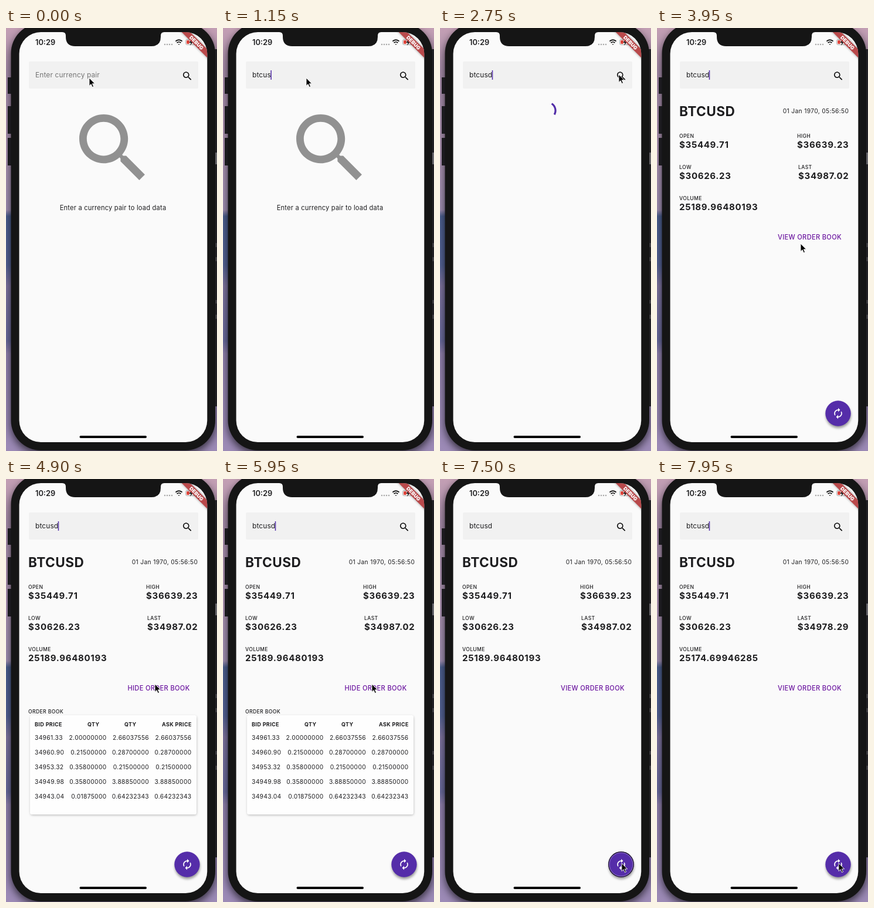
An HTML page for the animation above (8 s loop, 360 by 720 pixels).

```html
<!DOCTYPE html>
<html lang="en">
<head>
<meta charset="utf-8">
<title>Currency pair lookup</title>
<style>
  html, body { margin: 0; width: 100%; height: 100%; overflow: hidden; background: #151515; }
  svg { display: block; width: 100vw; height: 100vh; }
  text { font-family: Inter, sans-serif; fill: #1d1d1f; white-space: pre; }
  .input { font-size: 11.9px; letter-spacing: .13px; }
  .hint { fill: #757575; }
  .body { font-size: 11.1px; letter-spacing: .21px; }
  .title { font-size: 22.6px; font-weight: 700; letter-spacing: .5px; }
  .small { font-size: 10.24px; letter-spacing: .34px; }
  .label { font-size: 8.6px; font-weight: 500; letter-spacing: .38px; }
  .value { font-size: 15px; font-weight: 700; letter-spacing: .7px; }
  .button { font-size: 11.1px; font-weight: 500; letter-spacing: .32px; fill: #6a149f; text-anchor: middle; }
  .head { font-size: 9px; font-weight: 700; letter-spacing: .38px; }
  .end { text-anchor: end; }
</style>
</head>
<body>
<svg viewBox="0 0 360 720">
  <defs>
    <linearGradient id="sky" x2="0" y2="1">
      <stop offset="0" stop-color="#c39fb4"/>
      <stop offset=".1" stop-color="#a58ba8"/>
      <stop offset=".3" stop-color="#aa92b0"/>
      <stop offset=".43" stop-color="#a08fb2"/>
      <stop offset=".445" stop-color="#4c5f8f"/>
      <stop offset=".56" stop-color="#546294"/>
      <stop offset=".61" stop-color="#7f749f"/>
      <stop offset=".74" stop-color="#696a9c"/>
      <stop offset=".77" stop-color="#9080ac"/>
      <stop offset="1" stop-color="#9c8ab6"/>
    </linearGradient>
    <clipPath id="screen"><rect x="22.500" y="7" width="320.800" height="698" rx="37"/></clipPath>
    <filter id="soft" x="-30%" y="-30%" width="160%" height="160%"><feGaussianBlur stdDeviation="2"/></filter>
    <filter id="wide" x="-30%" y="-30%" width="160%" height="160%"><feGaussianBlur stdDeviation="7"/></filter>
    <path id="lens" d="M15.5 14h-.79l-.28-.27C15.41 12.59 16 11.11 16 9.5 16 5.91 13.09 3 9.5 3S3 5.91 3 9.5 5.91 16 9.5 16c1.61 0 3.09-.59 4.23-1.57l.27.28v.79l5 4.99L20.49 19zM9.5 14C7.01 14 5 11.99 5 9.5S7.01 5 9.5 5 14 7.01 14 9.5 11.99 14 9.5 14z"/>
  </defs>

  <rect width="360" height="720" fill="url(#sky)"/>
  <rect x="352" y="36" width="8" height="608" fill="#2d2c31"/>
  <rect x="357" y="212" width="3" height="20" fill="#8c8a90"/>
  <path d="M358.500 366v7M358.500 390v7M358.500 463v6M358.500 488v7" stroke="#8c8a90"/>
  <rect x="8.500" y="-2" width="348.500" height="727" rx="51" fill="#000" opacity=".65" filter="url(#wide)"/>
  <path d="M6 84v28M6 133v47M6 187v47" stroke="#1b1a1e" stroke-width="6"/>
  <rect x="8.500" y="-8" width="348.500" height="727" rx="51" fill="#151515"/>

  <g clip-path="url(#screen)">
    <rect x="22" y="7" width="322" height="698" fill="#fafafa"/>
    <path d="M96 7q6 0 6 6v2q0 16 16 16h130q16 0 16-16v-2q0-6 6-6z" fill="#151515"/>
    <text x="50" y="29" font-size="12.800" font-weight="600">10:29</text>
    <path d="M271 28h13" stroke="#aaa" stroke-width="2.600" stroke-linecap="round" stroke-dasharray="0 4"/>
    <g fill="none" stroke="#111" stroke-width="1.900">
      <path d="M289.400 22.600a8 8 0 0 1 11.200 0M291.600 25.200a5 5 0 0 1 6.800 0"/>
      <path d="M293.600 27.200h2.800l-1.400 1.800z" fill="#111" stroke="none"/>
    </g>
    <rect x="306.500" y="19.500" width="18" height="9" rx="2.600" fill="none" stroke="#a9a9a9"/>
    <rect x="308" y="21" width="5" height="6" rx="1" fill="#e0473e"/>
    <path d="M317.500 18.500l-5 6.500h3l-1.500 5 5-6.500h-3z" fill="#111"/>
    <g transform="translate(325 25) rotate(45)">
      <rect x="-40" y="-5.100" width="80" height="10.200" fill="#000" opacity=".4" filter="url(#soft)"/>
      <rect x="-40" y="-5.100" width="80" height="10.200" fill="#b9494b"/>
      <text y="3.100" font-size="8.500" font-weight="900" text-anchor="middle" style="fill:#fff">DEBUG</text>
    </g>

    <rect x="39" y="57" width="289" height="46" rx="2" fill="#f1f1f1"/>
    <text id="hint" class="input hint" x="50" y="84">Enter currency pair</text>
    <text id="typed" class="input" x="50" y="84"></text>
    <rect id="caret" y="72" width="1.500" height="16" fill="#512da8"/>
    <use href="#lens" transform="translate(299.500 72) scale(.82)" fill="#111"/>

    <g id="empty">
      <use href="#lens" transform="translate(105.800 127.800) scale(6.400)" fill="#919191"/>
      <text class="body" x="182.500" y="309.500" text-anchor="middle">Enter a currency pair to load data</text>
    </g>
    <path id="spinner" fill="none" stroke="#512da8" stroke-width="3.200"/>
    <g id="data"></g>
    <g id="book">
      <rect x="42" y="404" width="283" height="168" rx="3" fill="#000" opacity=".28" filter="url(#soft)"/>
      <rect x="41" y="402" width="284" height="169" rx="3" fill="#fefefe"/>
    </g>
    <g id="fab">
      <circle cx="309.500" cy="659.500" r="21.500" fill="#000" opacity=".4" filter="url(#soft)"/>
      <circle cx="309" cy="656" r="21.700" fill="#552da9"/>
      <g id="ring" fill="none">
        <circle cx="309" cy="656" r="21.300" stroke="#1a1226" stroke-width="1.200"/>
        <circle cx="309" cy="656" r="20" stroke="#9c86cb" stroke-width=".8"/>
      </g>
      <path transform="translate(298.800 645.800) scale(.853)" fill="#fff" d="M12 6v3l4-4-4-4v3c-4.420 0-8 3.580-8 8 0 1.570.46 3.030 1.240 4.260L6.700 14.800c-.45-.83-.7-1.790-.7-2.800 0-3.310 2.690-6 6-6zm6.760 1.740L17.300 9.200c.44.84.7 1.790.7 2.800 0 3.310-2.690 6-6 6v-3l-4 4 4 4v-3c4.420 0 8-3.580 8-8 0-1.570-.46-3.030-1.240-4.260z"/>
    </g>
    <rect x="125.500" y="694" width="114.500" height="4" rx="2" fill="#000"/>
  </g>
  <path id="mouse" d="M0 0v13.500l3.100-2.900 2.200 5 2.200-1-2.200-4.800h4.300z" fill="#000" stroke="#fff" stroke-width=".9"/>
</svg>

<script>
const LOOP = 8000;
const KEYS = [400, 560, 930, 1030, 1110, 1280];
const FOCUS = 200, LOAD = 2530, READY = 3150, OPEN = 4450, CLOSE = 6250, PRESS = 7400, FRESH = 7750;
// [start, end, x, y]: each move begins where the previous one stopped
const MOVES = [
  [0, 0, 142, 85],
  [1800, 2450, 305, 79],
  [3500, 3950, 245, 367],
  [3950, 4300, 254, 349],
  [6500, 7250, 310, 654]
];
const $ = id => document.getElementById(id);

function addText(parent, cls, x, y, str) {
  const el = document.createElementNS('http://www.w3.org/2000/svg', 'text');
  el.setAttribute('class', cls);
  el.setAttribute('x', x);
  el.setAttribute('y', y);
  el.textContent = str;
  return parent.appendChild(el);
}

function addStat(x, y, label, value) {
  return [addText(data, 'label', x, y, label), addText(data, 'value', x, y + 17, value)];
}

const data = $('data'), book = $('book');
addText(data, 'title', 38, 149.5, 'BTCUSD');
addText(data, 'small end', 327.3, 144.5, '01 Jan 1970, 05:56:50');
addStat(38, 187, 'OPEN', '$35449.71');
addStat(239, 187, 'HIGH', '$36639.23');
addStat(38, 240, 'LOW', '$30626.23');
const last = addStat(241, 240, 'LAST', '');
const volume = addStat(38, 293, 'VOLUME', '')[1];
const toggle = addText(data, 'button', 260.5, 359.5, '');

addText(book, 'label', 38, 398.5, 'ORDER BOOK');
[[49, 'BID PRICE'], [139, 'QTY'], [202, 'QTY'], [266, 'ASK PRICE']]
  .forEach(([x, str]) => addText(book, 'head', x, 420.5, str));
[
  ['34961.33', '2.00000000', '2.66037556'],
  ['34960.90', '0.21500000', '0.28700000'],
  ['34953.32', '0.35800000', '0.21500000'],
  ['34949.98', '0.35800000', '3.88850000'],
  ['34943.04', '0.01875000', '0.64232343']
].forEach(([bid, qty, ask], i) => {
  const y = 444.3 + i * 25;
  addText(book, 'small', 49, y, bid);
  addText(book, 'small end', 171.5, y, qty);
  addText(book, 'small end', 244, y, ask);
  addText(book, 'small end', 316.5, y, ask);
});

const clamp = v => Math.max(0, Math.min(1, v));
const ease = v => v * v * (3 - 2 * v);
const show = (el, on) => el.setAttribute('display', on ? 'inline' : 'none');
const setText = (el, str) => { if (el.textContent !== str) el.textContent = str; };

function mouseAt(t) {
  let [, , x, y] = MOVES[0];
  for (const [from, to, tx, ty] of MOVES.slice(1)) {
    const k = ease(clamp((t - from) / (to - from)));
    x += (tx - x) * k;
    y += (ty - y) * k;
  }
  return [x, y];
}

function spinnerPath(age) {
  const cycle = age / 1333 % 1;
  const head = ease(clamp(cycle * 2)), tail = ease(clamp(cycle * 2 - 1));
  const start = Math.PI * (-.6 + 1.5 * tail + 2 * age / 2222 + .5 * cycle);
  const sweep = Math.PI * 1.5 * (head - tail) + .3;
  const point = a => `${183 + 14 * Math.cos(a)} ${140.5 + 14 * Math.sin(a)}`;
  return `M${point(start)}A14 14 0 ${+(sweep > Math.PI)} 1 ${point(start + sweep)}`;
}

function caretAlpha(t) {
  if (t < FOCUS) return 0;
  if (t < 1600) return 1;
  const p = (t + 400) % 1000;
  return p < 500 ? clamp(p / 100) : clamp((600 - p) / 100);
}

function draw(t) {
  const ready = t >= READY, opened = t >= OPEN && t < CLOSE, fresh = t >= FRESH;
  const count = KEYS.filter(k => t >= k).length;

  show($('hint'), !count);
  setText($('typed'), 'btcusd'.slice(0, count));
  $('caret').setAttribute('x', 49.5 + (count ? $('typed').getComputedTextLength() : 0));
  $('caret').setAttribute('opacity', caretAlpha(t));

  show($('empty'), t < LOAD);
  show($('spinner'), t >= LOAD && !ready);
  $('spinner').setAttribute('d', spinnerPath(Math.max(0, t - LOAD)));
  show(data, ready);
  show($('fab'), ready);
  show(book, opened);
  show($('ring'), t >= PRESS && t < FRESH);

  setText(toggle, `${opened ? 'HIDE' : 'VIEW'} ORDER BOOK`);
  setText(last[1], fresh ? '$34978.29' : '$34987.02');
  last.forEach(el => el.setAttribute('x', fresh ? 239.7 : 241));
  setText(volume, fresh ? '25174.69946285' : '25189.96480193');
  $('mouse').setAttribute('transform', `translate(${mouseAt(t)})`);
}

const origin = performance.now();
function tick() {
  draw((performance.now() - origin) % LOOP);
  requestAnimationFrame(tick);
}
tick();
</script>
</body>
</html>
```
